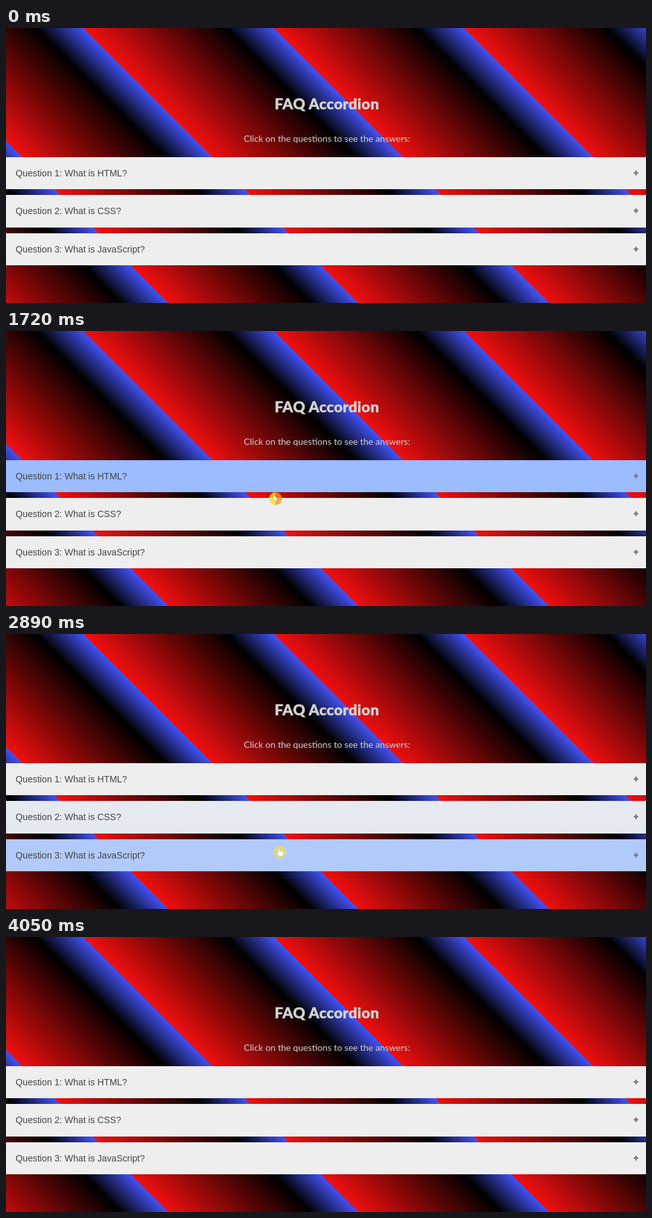
Recreate the animation shown at these times as an HTML page. Size 1000 px wide and 430 px high, loop 4150 ms.

```html
<!DOCTYPE html>
<html lang="en">
<head>
<meta charset="utf-8">
<title>FAQ Accordion</title>
<style>
html, body { margin: 0; width: 100%; height: 100%; overflow: hidden; }
#stage {
  position: relative; width: 1000px; height: 430px; overflow: hidden;
  font-family: Lato, "Open Sans", sans-serif; color: #d3d3d3;
}
/* The gradient belongs to a page slightly larger than the stage. */
#back {
  position: absolute; left: 0; top: 0; width: 1013px; height: 474px;
  background: repeating-linear-gradient(45deg, #f00f0f, #000 15%, #4352f5 20%);
}
#page { position: absolute; left: 0; top: 0; width: 1000px; }
#page > * { position: absolute; margin: 0; white-space: nowrap; }
h2, p { left: 1.5px; width: 1000px; text-align: center; }
h2 {
  top: 102px; font-size: 23.4px; line-height: 32px; font-weight: 800;
  letter-spacing: .4px; -webkit-text-stroke: .6px;
}
p { top: 161px; font-size: 14.1px; line-height: 24px; }
.row {
  left: 0; width: 1000px; height: 50.3px; box-sizing: border-box; padding: 0 12px 0 15px;
  display: flex; justify-content: space-between; line-height: 50px;
  font-family: "Liberation Sans", Arial, sans-serif; font-size: 14.2px; color: #444;
}
.row b { font-size: 12.3px; color: #777; -webkit-text-stroke: .8px; }
.panel {
  height: 49px; background: #fff; color: #333;
  font-size: 13.97px; line-height: 49px; text-align: center;
}
#cursor { position: absolute; left: -10px; top: -10px; width: 20px; height: 20px; }
#ring { position: absolute; inset: 0; border-radius: 50%; }
#cursor svg { position: absolute; inset: 0; fill: #fff; stroke: #777; stroke-width: .4; }
</style>
</head>
<body>
<div id="stage">
  <div id="back"></div>
  <div id="page">
    <h2>FAQ Accordion</h2>
    <p>Click on the questions to see the answers:</p>
  </div>
  <div id="cursor">
    <div id="ring"></div>
    <svg viewBox="-10 -10 20 20">
      <path id="hand" d="M-2.500 -6.500q1.200 -1.200 2.400 0v4l4.300 1q2 .3 1.600 3.500l-1 4.500h-6l-4.300 -5.500q0 -1.800 3 -.5z"/>
      <path id="arrow" d="M-3 -6v10l2.300 -2 1.700 3.500 1.500 -.8 -1.600 -3.300h3z"/>
    </svg>
  </div>
</div>
<script>
const LOOP = 4150, FADE = 180, FLASH = 200;
const TOP = 201.6, PITCH = 59.7, PANEL = 54.4, LIFT = -27.2, CENTER = 501.2;
const $ = id => document.getElementById(id);
const clamp = v => Math.max(0, Math.min(1, v));

// open: panel shown; tints: [start, end] of each highlight
const items = [
  { q: "What is HTML?", width: 636, open: [950, 1630], tints: [[660, 1910]],
    a: "HTML stands for HyperText Markup Language. It is used to create webpages and web applications." },
  { q: "What is CSS?", width: 600, open: [2000, 2600], tints: [[500, 675], [1760, 2910]],
    a: "CSS stands for Cascading Style Sheets. It is used to style the layout of webpages." },
  { q: "What is JavaScript?", width: 665, open: [2980, 3650], tints: [[400, 580], [2760, 3900]],
    a: "JavaScript is a programming language commonly used to create interactive effects within web browsers." }
];
const clicks = items.flatMap(item => item.open).map(t => t - 10);

// Pointer path: time, x, y
const path = [
  [300, 442, 450], [670, 432, 252], [900, 430, 238], [1150, 430, 240], [1500, 424, 222],
  [1620, 423, 222], [1720, 421, 262], [1950, 424, 292], [2300, 426, 294], [2540, 425, 282],
  [2600, 425, 284], [2690, 425, 315], [2920, 428, 345], [3270, 430, 341], [3640, 429, 338],
  [3970, 446, 450]
];

function add(className, html) {
  const el = document.createElement("div");
  el.className = className;
  el.innerHTML = html;
  $("page").append(el);
  return el;
}

items.forEach((item, i) => {
  item.row = add("row", `<span>Question ${i + 1}: ${item.q}</span><b></b>`);
  item.sign = item.row.querySelector("b");
  item.panel = add("panel", item.a);
  item.panel.style.width = item.width + "px";
  item.panel.style.left = CENTER - item.width / 2 + "px";
});

function tint(item, t) {
  const k = Math.max(...item.tints.map(([on, off]) =>
    Math.min(clamp((t - on) / FADE), clamp((off - t) / FADE))));
  const mix = (a, b) => Math.round(a + (b - a) * k);
  return `rgb(${mix(238, 155)},${mix(238, 188)},${mix(238, 255)})`;
}

function pointerAt(t) {
  const i = path.findIndex(p => p[0] > t);
  if (i < 1) return null;
  const [t0, x0, y0] = path[i - 1], [t1, x1, y1] = path[i];
  const k = (t - t0) / (t1 - t0);
  return [x0 + (x1 - x0) * k, y0 + (y1 - y0) * k];
}

function draw(t) {
  const isOpen = item => t >= item.open[0] && t < item.open[1];
  const shift = items.some(isOpen) ? LIFT : 0;
  $("page").style.top = shift + "px";

  const pointer = pointerAt(t);
  let y = TOP, hover = false;
  for (const item of items) {
    const open = isOpen(item);
    item.row.style.top = y + "px";
    item.row.style.background = tint(item, t);
    item.sign.textContent = open ? "\u2212" : "+";
    item.panel.style.top = y + 55.3 + "px";
    item.panel.style.display = open ? "block" : "none";
    const tip = pointer ? pointer[1] - 7 - shift : -1;
    if (tip >= y && tip <= y + 50) hover = true;
    y += PITCH + (open ? PANEL : 0);
  }

  $("cursor").style.display = pointer ? "block" : "none";
  if (!pointer) return;
  $("cursor").style.transform = `translate(${pointer[0]}px, ${pointer[1]}px)`;
  $("hand").style.display = hover ? "inline" : "none";
  $("arrow").style.display = hover ? "none" : "inline";
  const last = clicks.filter(c => c <= t).pop() ?? -LOOP;
  const flash = 100 * clamp(1 - (t - last) / FLASH);
  $("ring").style.background = `conic-gradient(#f59a10 ${flash}%, #fce428 0)`;
  $("ring").style.opacity = hover ? .62 : .8;
}

const start = performance.now();
function tick() {
  draw((performance.now() - start) % LOOP);
  requestAnimationFrame(tick);
}
tick();
</script>
</body>
</html>
```
